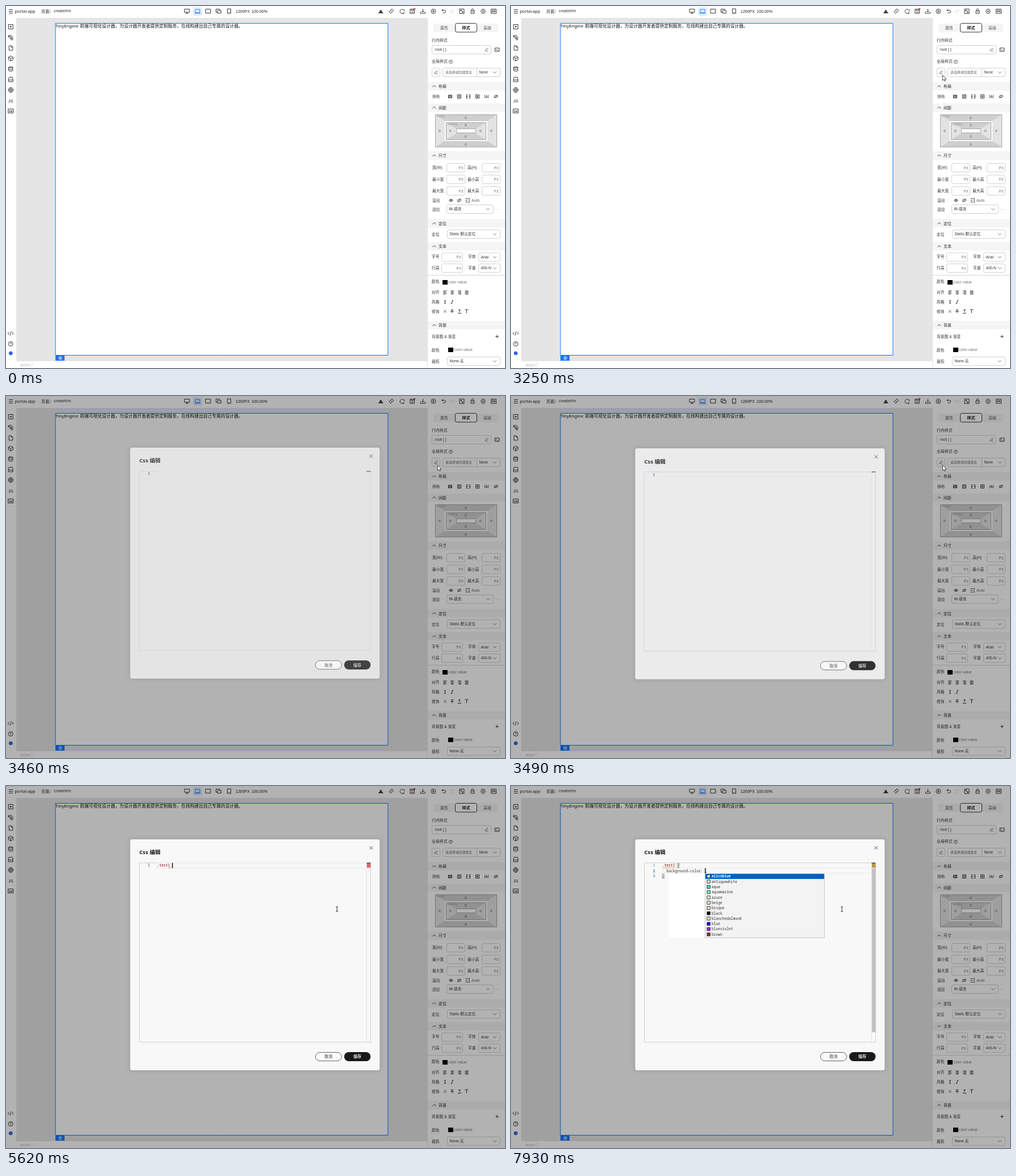
These frames come from a looping animation (878 px wide and 638 px high, 8000 ms). An HTML page with a canvas:

```html
<!DOCTYPE html>
<html lang="zh">
<head>
<meta charset="utf-8">
<style>
html, body { margin: 0; width: 100%; height: 100%; overflow: hidden; background: #fff; }
canvas { display: block; }
</style>
</head>
<body>
<canvas id="stage" width="878" height="638"></canvas>
<script>
const g = document.getElementById('stage').getContext('2d');
const SANS = '"Liberation Sans","Noto Sans CJK SC","Noto Sans CJK",sans-serif';
const HUMAN = '"Noto Sans","Noto Sans CJK SC","Noto Sans CJK",sans-serif';
const MONO = '"Noto Sans Mono","DejaVu Sans Mono",monospace';
const INK = '#222', BLUE = '#1476ff', LOOP = 8000;

// y is the vertical centre of the line
function text(s, x, y, size = 6.8, color = '#333', font = SANS, weight = '', align = 'left') {
  g.font = `${weight} ${size}px ${font}`;
  g.textAlign = align;
  g.fillStyle = color;
  g.fillText(s, x, y + size * 0.36);
}
function rect(x, y, w, h, fill) { g.fillStyle = fill; g.fillRect(x, y, w, h); }
function box(x, y, w, h, r, stroke, fill) {
  g.beginPath();
  g.roundRect(x, y, w, h, r);
  if (fill) { g.fillStyle = fill; g.fill(); }
  if (stroke) { g.strokeStyle = stroke; g.lineWidth = 1; g.stroke(); }
}
function icon(d, x, y, color = INK, width = 0.9, fill) {
  const path = new Path2D(d);
  g.save();
  g.translate(x, y);
  if (fill) { g.fillStyle = fill; g.fill(path); }
  g.strokeStyle = color;
  g.lineWidth = width;
  g.stroke(path);
  g.restore();
}

const circle = r => `M${r} 0A${r} ${r} 0 1 1 ${-r} 0A${r} ${r} 0 1 1 ${r} 0`;
const frame = (w, h) => `M${-w} ${-h}H${w}V${h}H${-w}Z`;
const UP = 'M-3 1.5L0 -1.5L3 1.5', DOWN = 'M-3 -1.5L0 1.5L3 -1.5';
const PENCIL = 'M-2.5 2.2L-2 .2L1.2 -3L2.8 -1.4L-.5 1.8ZM0 3H3';
const EYE = 'M-3.5 0Q0 -4 3.5 0Q0 4 -3.5 0' + circle(1);
const EYE_OFF = 'M-3.5 0Q0 -4 3.5 0Q0 4 -3.5 0M-3 3L3 -3';
const GEAR = 'M-2 -3.6H2L4 0L2 3.6H-2L-4 0Z' + circle(1.4);
const HELP = circle(4) + 'M-1.3 -1Q-1 -2.4 .3 -2.2Q2 -1.5 0 .6M0 1.6V2.4';
const ARROW = 'M0 0V9.3L2.1 7.4L3.5 10.5L5 9.8L3.7 6.8H6.7Z';

function topBar() {
  icon('M-3.5 -3H3.5M-3.5 0H3.5M-3.5 3H3.5', 8.5, 9.5);
  text('portal-app', 15.5, 9, 7.3, INK, HUMAN);
  text('页面：', 62, 9, 7.2, INK);
  text('createVm', 84, 9, 6.8, INK, HUMAN);
  box(329, 2, 16, 15, 2, null, '#e3eeff');
  icon('M-4.5 -3.5H4.5V2H-4.5ZM0 2V4M-2.5 4H2.5', 318.5, 9);
  icon('M-4 -3H4V2.5H-4ZM-5.5 4H5.5', 337, 9, BLUE);
  icon(frame(4.5, 3.5) + 'M2.5 0H3.3', 355.5, 9);
  icon('M-4.5 -3.5H2V-1M-4.5 -3.5V2H-2M-2 -1H4.5V3.5H-2Z', 374, 9);
  icon(frame(3, 4) + 'M-.7 2.5H.7', 392.5, 9);
  text('1200PX', 404, 9, 7, INK);
  text('100.00%', 432, 9, 7.1, INK);

  icon(circle(1.2) + 'M-1 1L-3 3H3L1 1', 659.5, 9, INK, 1.4);
  icon('M-4 1L1 -4L4 -1L-1 4ZM-1.5 -1.5L1.5 1.5', 678, 9);
  icon('M3.5 1A3.7 3.7 0 1 1 2.6 -2.6M3.8 -.2V-3.6M1 3L4 4', 697, 9.5);
  icon('M-4 -3.5H3.5V4H-4ZM-2 -3.5V-1H2V-3.5M-2 2H2', 715, 9);
  icon(circle(1), 719, 5, '#e22', 1, '#e22');
  icon('M0 -4V2M-2.5 -.5L0 2L2.5 -.5M-4 1V4H4V1', 733.5, 9);
  icon(circle(4) + 'M-1 -1.8V1.8L2 0Z', 752, 9.3);
  icon('M-3 -1.5H1.5Q3.5 -1.5 3.5 .8T1.5 3H-1.5M-1 -3.5L-3 -1.5L-1 .5', 770, 9);
  icon('M3 -1.5H-1.5Q-3.5 -1.5 -3.5 .8T-1.5 3H1.5M1 -3.5L3 -1.5L1 .5', 785, 9, '#ddd');
  icon(frame(4, 4) + 'M-2 -2L2 2M-2 0V-2H0M2 0V2H0', 802, 9.3);
  icon('M-3 -.5H3V4H-3ZM-2 -.5V-2Q-2 -4 0 -4T2 -2V-.5M0 1V2.4', 821, 9);
  icon(GEAR, 839.5, 9.3);
  icon(frame(4.5, 3.8), 858, 9.3);
  text('EN', 858, 9.3, 4.8, INK, SANS, 'bold', 'center');
}

function sideBar() {
  icon(frame(4, 4) + 'M-2 0H2M0 -2V2', 8.3, 36.5);
  icon('M-4 -3.5H2M-2 -.8H4M-2 1.6H4M0 4H4M-4 -3.5V-1H-2', 8.5, 55.5, INK, 1.1);
  icon('M-3 -4H1L3.5 -1.5V4H-3ZM1 -4V-1.5H3.5', 8.3, 74);
  icon('M0 -4.3L4 -2V2.3L0 4.5L-4 2.3V-2ZM-4 -2L0 .2L4 -2M0 .2V4.5', 8.3, 92.3);
  icon('M-3.6 -3Q0 -5.5 3.6 -3V3Q0 5.5 -3.6 3ZM-3.6 -3Q0 -.5 3.6 -3M-3.6 0Q0 2.5 3.6 0', 8.3, 111);
  icon('M-3 -4H3L4 1V4H-4V1ZM-4 1H4', 8.3, 129.5);
  icon(circle(4.2) + 'M-4 0H4M0 -4Q-3.5 0 0 4Q3.5 0 0 -4', 8.3, 148);
  text('JS', 8.3, 167, 7.3, INK, SANS, '', 'center');
  icon(frame(4.5, 3.5), 8.3, 185);
  text('var', 8.3, 185, 4.5, INK, SANS, 'bold', 'center');
  icon('M-2.5 -2.5L-5 0L-2.5 2.5M2.5 -2.5L5 0L2.5 2.5M1 -3.5L-1 3.5', 8.3, 577);
  icon(HELP, 8.3, 595.5);
  icon(circle(3), 8.3, 612, '#3566d8', 1, '#3566d8');
}

function section(y, label) {
  rect(742, y - 7.5, 136, 15, '#f5f5f5');
  icon(UP, 753.5, y);
  text(label, 761, y, 7, INK);
}
function field(x, y, w, value, chevron) {
  box(x + .5, y - 7.5, w, 15, 2.5, '#d2d2d2', '#fff');
  if (value === 'PX') text('PX', x + w - 2, y + .5, 6.3, '#777', SANS, '', 'right');
  else text(value, x + 4.5, y, 6.7);
  if (chevron) icon(DOWN, x + w - 9, y, '#555', .8);
}
function swatch(x, y) {
  rect(x, y - 4, 9, 8, '#000');
  text('color value', x + 10, y, 6.8, '#777');
}

function boxModel() {
  const ring = (x, y, w, h, d, e) => {
    rect(x, y, w, h, '#cfcfcf');
    g.fillStyle = '#e3e3e3';
    for (const [a, b] of [[x, x + d], [x + w, x + w - d]]) {
      g.beginPath();
      g.moveTo(a, y); g.lineTo(b, y + e); g.lineTo(b, y + h - e); g.lineTo(a, y + h);
      g.fill();
    }
    box(x + .5, y + .5, w - 1, h - 1, 0, '#a5a5a5');
  };
  ring(755, 191, 109, 58, 18, 12);
  rect(772, 203, 75, 35, '#fff');
  ring(774, 205, 71, 31, 18, 11);
  box(792.5, 216.5, 34, 7, 0, '#aaa', '#fff');
  text('margin', 758, 194, 4.8, '#999');
  text('padding', 777, 208, 4.8, '#999');
  for (const [x, y] of [[809, 197], [763, 220], [854, 220], [809, 244], [809, 210], [782, 220], [835, 220], [809, 230]])
    text('0', x, y, 6, '#444', SANS, '', 'center');
}

function panel() {
  rect(741, 21, 137, 617, '#fff');
  rect(741, 21, 1, 617, '#e2e2e2');
  box(752, 31, 114, 15, 3, null, '#f5f5f5');
  box(790.5, 30.5, 38, 15.5, 3, '#333', '#fff');
  text('属性', 771, 38.5, 7, '#555', SANS, '', 'center');
  text('样式', 809.5, 38.5, 7, '#111', SANS, 'bold', 'center');
  text('高级', 847, 38.5, 7, '#555', SANS, '', 'center');

  text('行内样式', 749, 60.5, 6.9);
  field(749, 77, 104, ':root { }');
  icon(PENCIL, 845.5, 77, '#555', .7);
  icon(frame(3.8, 3) + 'M-2 -1.2L-.8 0L-2 1.2M.4 1.2H2', 864, 77);
  text('全局样式', 749, 98, 6.9);
  g.save(); g.translate(782.5, 98.3); g.scale(.75, .75); icon(HELP, 0, 0); g.restore();
  field(749, 117, 14, '');
  icon(PENCIL, 756.5, 117, '#444', .7);
  field(768, 117, 101, '', true);
  rect(828, 110, 1, 15, '#d2d2d2');
  text('请选择或创建类名', 773, 117.3, 5.9, '#666');
  text('None', 832.5, 117, 6.4);

  section(141.5, '布局');
  text('排布', 750, 159.5);
  icon(frame(3, 2.5) + 'M-3 -1H3M-3 1H3', 781.5, 159.5);
  icon(frame(3, 3) + 'M-1 -2V2M1 -2V2', 797.5, 159.5);
  icon('M-3 -3H-1M1 -3H3M-3 0H-1M1 0H3M-3 3H-1M1 3H3M-3 -3V3M3 -3V3', 813.5, 159.5);
  icon(frame(3, 3) + frame(1, 1), 829.5, 159.5);
  icon('M-3.2 -3V3M3.2 -3V3M-1.6 2.5L0 -2.5L1.6 2.5M-1 1H1', 845.5, 159.5, INK, .7);
  icon(EYE_OFF, 862, 159.5);

  section(179, '间距');
  boxModel();

  section(263.5, '尺寸');
  [['宽(W)', '高(H)'], ['最小宽', '最小高'], ['最大宽', '最大高']].forEach(([a, b], i) => {
    const y = 285 + i * 20.5;
    text(a, 750, y);
    field(775, y, 32, 'PX');
    text(b, 812, y);
    field(837, y, 32, 'PX');
  });
  text('溢出', 750, 342.5);
  icon(EYE, 783, 342.5);
  icon(EYE_OFF, 797.5, 342.5);
  icon('M-3.5 -3H1M-3.5 0H0M-3.5 3H1M3 -3.5V3.5M2 -3.5H4M2 3.5H4', 812, 342.5, INK, .8);
  text('Auto', 819, 342.5, 7, '#666');
  text('适应', 750, 358.5);
  field(775, 358, 82, 'fill-填充', true);
  text('···', 861, 358, 7, '#888');

  section(383, '定位');
  text('定位', 749, 402.5);
  field(776, 402, 93, 'Static-默认定位', true);

  section(423.5, '文本');
  [[442.5, '字号', '字体', 'Arial'], [462, '行高', '字重', '400-N']].forEach(([y, a, b, v]) => {
    text(a, 749, y - .5);
    field(766, y, 37, 'PX');
    text(b, 813, y - .5);
    field(831, y, 38, v, true);
  });
  rect(742, 474, 136, 1, '#d5d5d5');
  text('颜色', 749, 486);
  swatch(768, 487);
  text('对齐', 749, 505);
  ['M-3 -1H1M-3 1H3M-3 -2.8H3M-3 2.8H1', 'M-3 -2.8H3M-2 -1H2M-3 1H3M-2 2.8H2',
   'M-3 -2.8H3M-1 -1H3M-3 1H3M-1 2.8H3', 'M-3 -2.8H3M-3 -1H3M-3 1H3M-3 2.8H3']
    .forEach((d, i) => icon(d, 772.5 + i * 12.7, 505));
  text('风格', 749, 521.5);
  icon('M-1.6 -2.5H1.6M0 -2.5V2.5M-1.6 2.5H1.6', 772.5, 521.5);
  icon('M-.5 -2.5H2.5M1 -2.5L-1 2.5M-2.5 2.5H.5', 785, 521.5);
  text('修饰', 749, 538.5);
  icon('M-2.3 -2.3L2.3 2.3M2.3 -2.3L-2.3 2.3', 772.5, 538.3, INK, .7);
  icon('M-2 -2.8H2M0 -2.8V3M-3 0H3', 785, 538.3);
  icon('M-2 -2.8H2M0 -2.8V1.5M-3 3.2H3', 798, 538.3);
  icon('M-3 -3.2H3M0 -3V3', 810.5, 538.3);

  section(562.5, '背景');
  text('背景图 & 渐变', 749, 582.5);
  icon('M-2.8 0H2.8M0 -2.8V2.8', 864, 582.5);
  text('颜色', 749, 606.5);
  swatch(778, 606);
  text('裁剪', 749, 626.5);
  field(776, 626, 93, 'None-无', true);
}

function page() {
  rect(0, 0, 878, 638, '#fff');
  rect(18, 21, 723, 605, '#e5e5e5');
  box(87, 30.5, 585, 585, 0, BLUE, '#fff');
  text('TinyEngine', 87, 35.5, 7.8, '#111', HUMAN);
  text('前端可视化设计器，为设计器开发者提供定制服务，在线构建出自己专属的设计器。', 130, 35.5, 7.75, '#111');
  rect(87, 615, 16, 10, BLUE);
  g.save(); g.translate(95.5, 620.5); g.scale(.7, .7); icon(GEAR, 0, 0, '#fff', 1.2); g.restore();
  text('BODY', 26, 632.5, 6.2, '#aaa');
  icon('M-1 -4.5L1.5 0L-1 4.5', 45.5, 632, '#ddd');
  topBar();
  sideBar();
  panel();
}

// Code editor
const CW = 3.775, LEFT = 266, LINE = 9.3, ROW = 140.2;
const code = (s, col, row, color) => text(s, LEFT + col * CW, ROW + row * LINE, 6.28, color, MONO);

const TYPED = [[4420, '.'], [4660, '.t'], [4870, '.te'], [4930, '.tes'], [5020, '.test'],
  [5080, '.test1'], [5620, '.test1 '], [5710, '.test1 {']];
const PROPERTY = [[7480, 'b'], [7720, 'ba'], [7750, 'bac'], [7930, 'background-color: ']];
const latest = (list, t) => list.reduce((s, [at, v]) => t >= at ? v : s, '');

const COLORS = ['aliceblue', 'antiquewhite', 'aqua', 'aquamarine', 'azure', 'beige', 'bisque',
  'black', 'blanchedalmond', 'blue', 'blueviolet', 'brown'];
const PROPS = ['backdrop-filter', 'backface-visibility', 'background', 'background-attachment',
  'background-blend-mode', 'background-clip', 'background-color', 'background-image',
  'background-origin', 'background-position', 'background-repeat', 'background-size'];

function squiggle(x, end, color) {
  let d = `M${x} 144.6`;
  for (let up = 1; x < end; up = !up) d += `L${x += 1.4} ${up ? 143.6 : 144.9}`;
  icon(d, 0, 0, color, .8);
}
function bracket(col, row, s) {
  box(LEFT + col * CW - .2, ROW + row * LINE - 4, 4, 8, 0, '#b5b5b5', '#e9eee9');
  code(s, col, row, '#333');
}
function popup(x, items, swatches) {
  box(x + .5, 154.5, 210, 113, 0, '#c8c8c8', '#f3f3f3');
  rect(x + 1, 155, 209, 8.8, '#0060c0');
  items.forEach((s, i) => {
    const y = 159.2 + i * 9.3;
    if (swatches) box(x + 4, y - 2.7, 5.4, 5.4, 0, '#333', s);
    else icon('M-2 2L1 -1' + circle(1), x + 6.5, y, i ? '#555' : '#fff', .8);
    text(s, x + 12, y, 6.28, i ? '#333' : '#fff', MONO, i ? '' : 'bold');
  });
}

function editor(t) {
  const open = t >= 6130, row = open ? 1 : 0;
  const y = ROW + row * LINE;
  box(234.5, 135.5, 407, 316, 0, '#d0d0d0');
  rect(634, 136, 1, 315, '#e2e2e2');
  box(266.5, y - 4.7, 368, 9, 0, '#e8e8e8');
  for (let i = 0; i < (open ? 3 : 1); i++)
    text(i + 1, 253.5, ROW + i * LINE, 6.28, i === row ? '#0b216f' : '#237893', MONO, '', 'right');

  const head = latest(TYPED, t), prop = latest(PROPERTY, t);
  code(head.slice(0, 7), 0, 0, '#800000');
  if (head.length === 8) {
    if (t >= 5860) bracket(7, 0, '{'); else code('{', 7, 0, '#333');
    if (!open) t >= 5860 ? bracket(8, 0, '}') : code('}', 8, 0, '#333');
  }
  if (open) {
    rect(635, 145, 6.5, 289, '#c2c2c2');
    rect(635, 136, 6.5, 8, '#b8973a');
    bracket(0, 2, '}');
    squiggle(LEFT, 288, '#d9962b');
    code(prop, 2, 1, t >= 7930 ? '#333' : '#e50000');
    if (t >= 7930) code(';', 20, 1, '#333');
  } else if (t >= 5290) {
    rect(635, 136, 6.5, 8, t < 5890 ? '#d66' : '#b8973a');
    if (t < 5710) squiggle(286, 289, '#e33');
  }
  rect(634.5, 135, 7, 1.2, '#444');

  const caret = LEFT + (open ? 2 + prop.length : head.length) * CW;
  if (t >= 7930) {
    rect(278, 154, 63, 113, '#fff');
    popup(341, COLORS, true);
  } else if (t >= 7690) popup(Math.floor(caret), PROPS);

  const lit = t < 4420 ? t >= 3820 && t < 4120
    : t < 6280 || t >= 7480 || Math.floor((t - 6280) / 300) % 2 === 1;
  if (lit) rect(caret - .3, y - 4.7, 1.4, 9.2, '#000');
}

function dialog(t) {
  if (t < 3340) return;
  const u = Math.min(1, (t - 3340) / 300), ease = 1 - (1 - u) ** 3;
  rect(0, 0, 878, 638, `rgba(0,0,0,${0.3 * Math.min(1, (t - 3340) / 120)})`);
  g.save();
  g.globalAlpha = ease;
  g.translate(0, -14 * (1 - ease));
  g.shadowColor = 'rgba(0,0,0,.16)';
  g.shadowBlur = 8;
  box(218.5, 94, 439, 407, 4, null, '#f8f8f8');
  g.shadowColor = 'transparent';
  text('Css 编辑', 234.5, 116.8, 9.6, '#191919', HUMAN, 'bold');
  icon('M-3 -3L3 3M3 -3L-3 3', 642.5, 109, '#444', .9);
  box(544.5, 469.5, 46, 15, 7.5, '#666', '#fafafa');
  text('取消', 567.5, 477, 6.9, '#333', SANS, '', 'center');
  box(595, 469, 46.5, 16, 8, null, '#191919');
  text('保存', 618.2, 477, 6.9, '#fff', SANS, 'bold', 'center');
  editor(t);
  g.restore();
}

// Pointer: time, x, y
const PATH = [[100, 856, 142], [400, 856, 142], [520, 825, 176], [640, 775, 165], [730, 735, 135],
  [820, 739, 106], [970, 739, 105], [1240, 740, 105], [1450, 772, 97], [1690, 750, 126],
  [1870, 743, 118], [2050, 749, 107], [2080, 752, 115], [2230, 752, 115], [2290, 759, 122],
  [3520, 759, 122], [3790, 582, 217], [LOOP, 582, 217]];

function pointer(t) {
  if (t < 100) return;
  const i = PATH.findIndex(p => p[0] > t), [t0, x0, y0] = PATH[i - 1], [t1, x1, y1] = PATH[i];
  const k = (t - t0) / (t1 - t0);
  const x = Math.round(x0 + (x1 - x0) * k), y = Math.round(y0 + (y1 - y0) * k);
  if (t > 3520 && x < 634) icon('M-2 -4H2M0 -4V4M-2 4H2', x + .3, y, '#333', 1);
  else icon(ARROW, x + .5, y, '#222', .8, '#fff');
  if (t >= 2290 && t < 2620) {
    box(764.5, 129.5, 42, 12, 1, '#bbb', '#fff');
    text('编辑样式', 785.5, 135.5, 6.8, '#555', SANS, '', 'center');
  }
}

const start = performance.now();
function draw(now) {
  const t = Math.max(0, now - start) % LOOP;
  page();
  dialog(t);
  pointer(t);
  requestAnimationFrame(draw);
}
draw(start);
</script>
</body>
</html>
```
